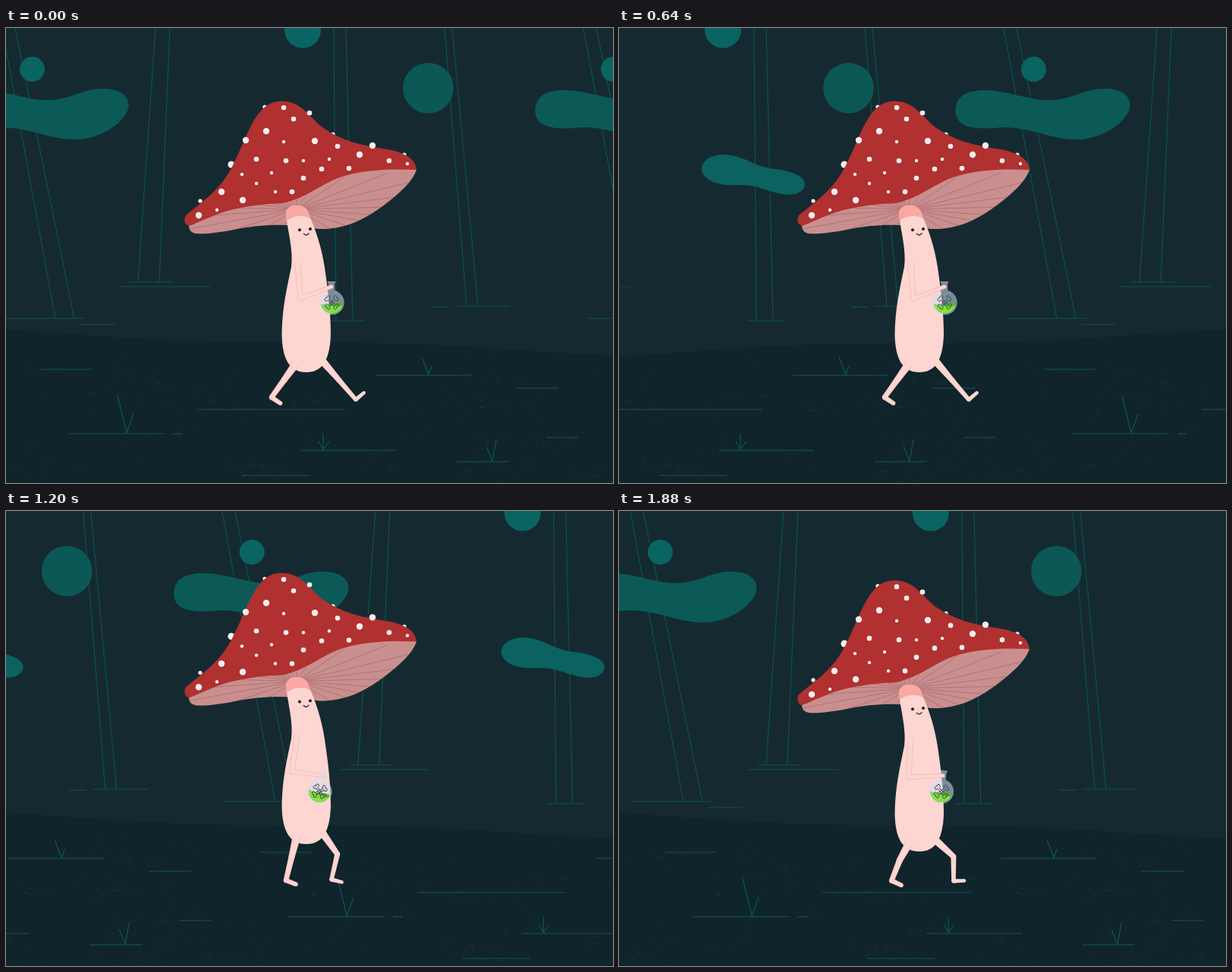
An HTML page with a canvas for the animation above (1920 ms loop, 800 by 600 pixels).

```html
<!DOCTYPE html>
<html lang="en">
<head>
<meta charset="utf-8">
<title>Walking mushroom</title>
<style>
html, body { margin: 0; width: 100%; height: 100%; overflow: hidden; background: #152a30; }
canvas { display: block; width: 800px; height: 600px; }
</style>
</head>
<body>
<canvas id="stage" width="800" height="600"></canvas>
<script>
const ctx = document.getElementById('stage').getContext('2d');
const LOOP = 1920, WALK = 640, TICK = 40, TURN = Math.PI * 2;
const NIGHT = '#152a30', SOIL = '#10242b', TWIG = '#0b5250', GRASS = '#0c5956';
const SKIN = '#fdd5d1', EDGE = '#eeb2ac', RED = '#b13030', GILL = '#c98f8e', WHITE = '#f7eeee', INK = '#1d1a1c';

// Smooth cyclic curve through rows of [time, ...values].
function cycle(rows, t, loop) {
  const n = rows.length;
  t = (t + loop) % loop;
  const row = k => {
    const turn = Math.floor(k / n), r = rows[k - turn * n];
    return [r[0] + turn * loop, ...r.slice(1)];
  };
  let i = n - 1;
  while (rows[i][0] > t) i--;
  const [a, b, c, d] = [row(i - 1), row(i), row(i + 1), row(i + 2)];
  const h = c[0] - b[0], u = (t - b[0]) / h;
  return b.slice(1).map((p, j) => {
    const q = c[j + 1];
    const m = (q - a[j + 1]) / (c[0] - a[0]) * h;
    const k = (d[j + 1] - p) / (d[0] - b[0]) * h;
    return p + u * (m + u * (3 * (q - p) - 2 * m - k + u * (2 * (p - q) + m + k)));
  });
}

// ---------- drawing helpers ----------
function line(...p) {
  ctx.beginPath();
  ctx.moveTo(p[0], p[1]);
  for (let i = 2; i < p.length; i += 2) ctx.lineTo(p[i], p[i + 1]);
  ctx.stroke();
}
function disc(x, y, r, color) {
  ctx.fillStyle = color;
  ctx.beginPath();
  ctx.arc(x, y, r, 0, TURN);
  ctx.fill();
}
function fill(path, color) {
  ctx.fillStyle = color;
  ctx.fill(path);
}
function at(x, y, draw) {
  ctx.save();
  ctx.translate(x, y);
  draw();
  ctx.restore();
}
// The object and its follower one gap behind.
function twice(x, gap, draw) {
  at(x, 0, draw);
  at(x + gap, 0, draw);
}

// Tapered limb: joints as [x, y] pairs, one width per joint.
function limb(joints, widths, color, extra = 0) {
  joints.forEach(([x, y], i) => {
    const r = (widths[i] + extra) / 2;
    disc(x, y, r, color);
    if (!i) return;
    const [px, py] = joints[i - 1], pr = (widths[i - 1] + extra) / 2;
    const len = Math.hypot(x - px, y - py) || 1;
    const nx = (py - y) / len, ny = (x - px) / len;
    ctx.beginPath();
    ctx.moveTo(px + nx * pr, py + ny * pr);
    ctx.lineTo(x + nx * r, y + ny * r);
    ctx.lineTo(x - nx * r, y - ny * r);
    ctx.lineTo(px - nx * pr, py - ny * pr);
    ctx.fill();
  });
}
function nearLimb(joints, widths) {
  limb(joints, widths, EDGE, 1.2);
  limb(joints, widths, SKIN);
  disc(...joints[0], widths[0] / 2 + 1, SKIN);
}

// ---------- scenery ----------
const GAP = 766, DRIFT = 762, FIELD = 774;
// x, ground y, then [left, width] of the trunk's foot and top, and its ground lines.
const TREES = [
  { x: 149, y: 335, foot: [25, 28], top: [48, 19], lines: [[14, 71, 335], [0, 120, 341]] },
  { x: 560, y: 367, foot: [47, 15], top: [18, 10], lines: [[0, 22, 368], [31, 104, 367]] },
  { x: 422, y: 386, foot: [13, 22], top: [10, 16], lines: [[0, 50, 386]] },
  { x: -1, y: 383, foot: [66, 25], top: [-4, 17], lines: [[0, 105, 383], [99, 144, 391]] }
];
const LONG_LEAF = new Path2D('M0 110C0 91 12 82 40 82C72 83 98 96 125 95C158 94 168 79 200 80' +
  'C222 81 231 92 230 103C228 123 194 147 160 147C124 147 102 131 62 131C28 134 1 133 0 110Z');
const SHORT_LEAF = new Path2D('M0 186C1 173 15 166 32 167C58 169 68 183 97 186C121 189 136 196 136 206' +
  'C135 217 122 222 106 219C80 214 76 207 50 207C20 209 1 200 0 186Z');
const ball = (y, r) => { const p = new Path2D(); p.arc(0, y, r, 0, TURN); return p; };
const FLOATS = [
  [-68.5, LONG_LEAF, '#0b5a57'],
  [363, SHORT_LEAF, '#0b6260'],
  [556.5, ball(79.3, 33.3), '#0b5856'],
  [391, ball(2.6, 24), '#0a6461'],
  [34.5, ball(54.3, 16.5), '#0a6461']
];
const STROKES = [
  [45, 112, 450], [487, 613, 458], [672, 728, 475], [252, 447, 503], [82, 209, 535],
  [220, 232, 535], [389, 515, 557], [594, 662, 572], [712, 754, 540], [311, 400, 590]
];
const TUFTS = [
  [548, 434, 557, 457, 561, 446], [147, 485, 159, 534, 168, 509], [633, 552, 641, 571, 646, 543],
  [412, 545, 418, 556, 426, 545], [418, 535, 418, 556]
];
const SOIL_TILT = [[0, 17], [400, 0], [640, -18], [920, 0], [1200, 17], [1680, 0], [1880, 17]];

let seed = 7;
const rnd = () => (seed = seed * 16807 % 2147483647) / 2147483647;
const SPECKS = [];
for (let i = 0; i < 70; i++) {
  const x = rnd() * FIELD, y = 435 + rnd() * 160;
  for (let j = 0; j < 9; j++) SPECKS.push([x + (rnd() - .5) * 50, y + (rnd() - .5) * 20, 1 + rnd() * 5]);
}

function drawTrees(shift) {
  ctx.strokeStyle = TWIG;
  ctx.lineWidth = 1.2;
  for (const { x, y, foot, top, lines } of TREES) twice(x - shift, GAP, () => {
    line(top[0], 0, foot[0], y);
    line(top[0] + top[1], 0, foot[0] + foot[1], y);
    for (const [l, r, ly] of lines) line(l, ly, r, ly);
  });
}
function drawFloats(shift) {
  for (const [x, path, color] of FLOATS) twice(x - shift, GAP, () => fill(path, color));
}
function drawSoil(t) {
  const [tilt] = cycle(SOIL_TILT, t, LOOP), mid = 402 + Math.abs(tilt) * .75;
  ctx.fillStyle = SOIL;
  ctx.beginPath();
  ctx.moveTo(0, 600);
  ctx.lineTo(0, mid - tilt);
  ctx.bezierCurveTo(160, mid - tilt * .4, 200, mid, 400, mid);
  ctx.bezierCurveTo(600, mid, 640, mid + tilt * .6, 800, mid + tilt);
  ctx.lineTo(800, 600);
  ctx.fill();
  twice(-FIELD * t / LOOP, FIELD, () => {
    ctx.fillStyle = 'rgba(48,72,78,.22)';
    for (const [x, y, w] of SPECKS) ctx.fillRect(x, y, w, 1.2);
    ctx.strokeStyle = GRASS;
    ctx.lineWidth = 1.2;
    for (const [l, r, y] of STROKES) line(l, y, r, y);
    for (const p of TUFTS) line(...p);
  });
}

// ---------- mushroom ----------
const CAP = new Path2D('M241 262C235 260 234 253 237 248C258 230 282 216 299 182C318 146 328 98 362 97.5' +
  'C392 97 400 121 420 134C444 150 466 155 496 160C526 164 540 174 541 188C520 194 400 232 383 236C330 240 280 246 241 262Z');
const UNDER = new Path2D('M241 262C262 254 280 244 305 239C330 234 345 233 365 232C400 224 414 206 446 196' +
  'C478 187 512 187 541 188C536 203 520 218 499 234C475 252 450 265 420 266C405 267 390 261 370 261' +
  'C345 260 325 262 300 267C280 271 262 273 250 272Q241 270 241 262Z');
const STEM = new Path2D('M369 246C369 238 376 235 383 235C392 235 398 239 399 247C407 264 416 289 420 317' +
  'C425 350 428 378 428 405C427 440 416 455 396 455C374 455 364 438 363.5 405C364 370 370 345 376 316C379 294 371 268 369 246Z');
const COLLAR = new Path2D('M369 246C369 238 376 235 383 235C392 235 398 239 399 247L401 252Q385 244 370 255Z');
const SPOTS = [
  [4.2, [[343, 137], [407, 150], [466, 168], [483, 156], [284, 217], [312, 228], [316, 149], [254, 248]]],
  [3.3, [[379, 121], [400, 113], [437, 157], [505, 176], [330, 174], [369, 176], [416, 187], [452, 186],
         [377, 217], [392, 199], [366, 106]]],
  [2.2, [[366, 151], [529, 180], [311, 194], [350, 192], [392, 176], [426, 174], [330, 206], [355, 217], [278, 241]]]
];
const RIM_SPOTS = [[341, 105], [431, 141], [525, 168], [297, 181], [256, 229]];

// Key poses on the body: elbow, hand (and flask angle).
const NEAR_ARM = [
  [0, 388, 358, 429, 342, -1], [280, 366, 352, 410, 353, 24], [400, 350, 345, 393, 357, 29],
  [560, 377, 359, 418, 365, 13], [600, 382, 357, 427, 355, 6]
];
const FAR_ARM = [
  [0, 396, 352, 388, 390], [280, 422, 352, 448, 389], [400, 447, 344, 491, 357], [560, 410, 356, 408, 392]
];
// One gait for both legs: ankle x from the hip, ankle y, toe angle, knee bend.
const GAIT = [
  [0, 44, 490, -40, 0], [80, 22, 490, 3, 16], [240, -15, 487, 22, 0], [320, -34, 487, 34, 0],
  [400, -48, 476, 98, 19], [560, 12, 486, 14, 14], [600, 24, 488, -2, 13]
];
const ARM = [7, 5.5, 4], LEG = [10, 7, 5.5, 4.5];

function leg(hipX, hipY, t) {
  const [dx, ankleY, toe, bend] = cycle(GAIT, t, WALK);
  const dy = ankleY - hipY, len = Math.hypot(dx, dy), a = toe * Math.PI / 180;
  return [
    [hipX, hipY],
    [hipX + dx / 2 + bend * dy / len, hipY + dy / 2 - bend * dx / len],
    [hipX + dx, ankleY],
    [hipX + dx + 14 * Math.cos(a), ankleY + 14 * Math.sin(a)]
  ];
}
function drawBone(angle) {
  ctx.save();
  ctx.rotate(angle);
  ctx.beginPath();
  ctx.moveTo(-6, -1.2);
  ctx.lineTo(6, -1.2);
  ctx.arc(8, -2, 2, 2.8, 7.4);
  ctx.arc(8, 2, 2, -1.2, 3.4);
  ctx.lineTo(-6, 1.2);
  ctx.arc(-8, 2, 2, 0, 4.3);
  ctx.arc(-8, -2, 2, 2, 6.2);
  ctx.stroke();
  ctx.restore();
}
const TIDE = new Path2D('M-20 0Q-8 5 0 2T20 1V20H-20Z');
const LIQUID = new Path2D('M-20 2Q-9 3 0 5T20 2V20H-20Z');
function drawFlask(x, y, degrees) {
  const turn = degrees * Math.PI / 180;
  ctx.save();
  ctx.translate(x, y);
  ctx.rotate(turn);
  ctx.translate(0, 21);
  ctx.fillStyle = 'rgba(212,220,238,.55)';
  ctx.beginPath();
  ctx.arc(0, 0, 16.3, -1.3, 4.44);
  ctx.lineTo(-4, -25);
  ctx.lineTo(4, -25);
  ctx.fill();
  ctx.fillRect(-5, -28, 10, 3);
  ctx.save();
  ctx.beginPath();
  ctx.arc(0, 0, 14.3, 0, TURN);
  ctx.clip();
  ctx.rotate(turn * .3);
  fill(TIDE, '#55b530');
  fill(LIQUID, '#86e046');
  ctx.restore();
  ctx.strokeStyle = '#34444a';
  ctx.lineWidth = .9;
  drawBone(.75);
  drawBone(-.75);
  ctx.restore();
}
function drawCap() {
  for (const [x, y] of RIM_SPOTS) disc(x, y, x === 297 ? 4.6 : 2.6, WHITE);
  fill(CAP, RED);
  fill(UNDER, GILL);
  ctx.save();
  ctx.clip(UNDER);
  ctx.strokeStyle = 'rgba(140,70,76,.5)';
  ctx.lineWidth = .8;
  for (let i = 0; i < 24; i++) {
    const a = i / 24 * TURN;
    line(383, 240, 383 + 170 * Math.cos(a), 236 + 62 * Math.sin(a));
  }
  ctx.restore();
  for (const [r, spots] of SPOTS) for (const [x, y] of spots) disc(x, y, r, WHITE);
}
function drawFace() {
  disc(387, 267.3, 2, INK);
  disc(401, 266, 2, INK);
  ctx.strokeStyle = INK;
  ctx.lineWidth = 1.3;
  ctx.lineCap = 'round';
  ctx.stroke(new Path2D('M392.3 272.2Q395.5 276 399 271.8'));
  ctx.lineCap = 'butt';
}
function drawMushroom(t) {
  // Two bounces per walk cycle, leaning towards a quick rise.
  const a = TURN * 2 * t / WALK, bob = 14.7 * Math.sin(a) - 5.3 * Math.sin(2 * a) - 1;
  const [ex, ey, hx, hy, angle] = cycle(NEAR_ARM, t, WALK);
  const [fx, fy, gx, gy] = cycle(FAR_ARM, t, WALK);
  limb(leg(417, 440 + bob, t), LEG, SKIN);
  at(0, bob, () => {
    limb([[414, 308], [fx, fy], [gx, gy]], ARM, SKIN);
    drawCap();
    fill(STEM, SKIN);
    fill(COLLAR, '#fba7a2');
    drawFace();
  });
  nearLimb(leg(384, 441 + bob, t + WALK / 2), LEG);
  at(0, bob, () => {
    drawFlask(hx, hy, angle);
    nearLimb([[384, 308], [ex, ey], [hx, hy]], ARM);
  });
}

const start = performance.now();
function frame() {
  const t = Math.floor((performance.now() - start) % LOOP / TICK) * TICK;
  const shift = DRIFT * t / LOOP;
  ctx.fillStyle = NIGHT;
  ctx.fillRect(0, 0, 800, 600);
  drawTrees(shift);
  drawFloats(shift);
  drawSoil(t);
  drawMushroom(t);
  requestAnimationFrame(frame);
}
frame();
</script>
</body>
</html>
```
